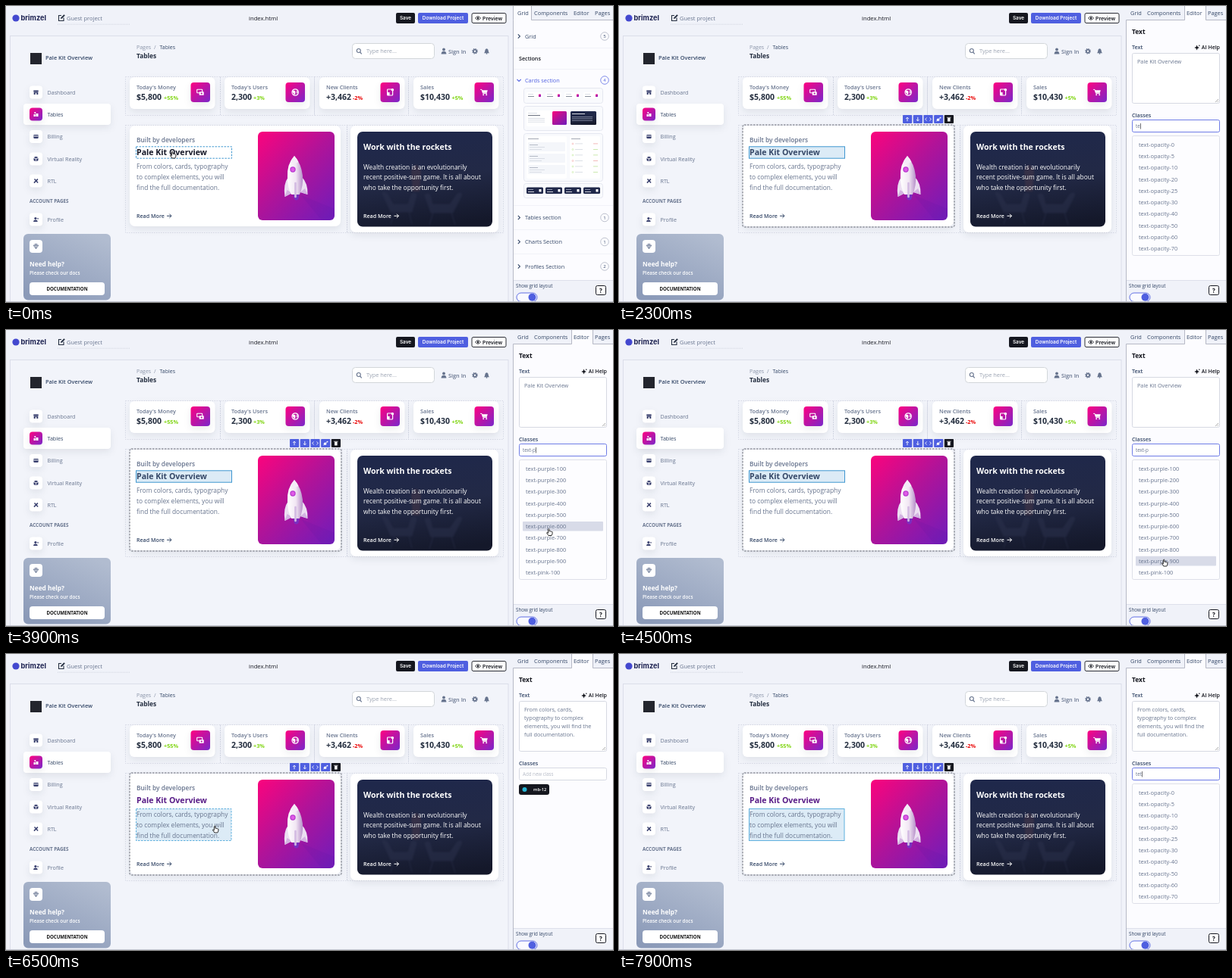
Write an HTML page that moves like this. It is 800 px wide and 391 px high and loops after 8000 ms.

```html
<!DOCTYPE html>
<html lang="en">
<head>
<meta charset="utf-8">
<title>Page editor</title>
<style>
html, body { margin: 0; height: 100%; overflow: hidden; background: #f0f2f9; }
svg { display: block; width: 100vw; height: 100vh; }
text { font-family: "Open Sans", "Noto Sans", sans-serif; white-space: pre; }
.ui { font-family: Inter, sans-serif; }
.soft { filter: drop-shadow(0 4px 5px #0f172a14); }
.blur { filter: blur(1.2px); }
</style>
</head>
<body>
<svg viewBox="0 0 800 391">
  <defs>
    <linearGradient id="pink" x1="0" y1="0" x2="1" y2="1"><stop stop-color="#ff0080"/><stop offset="1" stop-color="#7928ca"/></linearGradient>
    <linearGradient id="photo" x1="0" y1="0" x2=".9" y2="1"><stop stop-color="#fb047d"/><stop offset=".5" stop-color="#b01399"/><stop offset="1" stop-color="#741cb8"/></linearGradient>
    <linearGradient id="help" x1=".2" y1="1" x2=".8" y2="0"><stop stop-color="#8b9ab8"/><stop offset="1" stop-color="#b1bcd0"/></linearGradient>
    <linearGradient id="night" x1=".4" y1="0" x2=".6" y2="1"><stop stop-color="#1f284b"/><stop offset=".5" stop-color="#222946"/><stop offset="1" stop-color="#14182a"/></linearGradient>
    <linearGradient id="hull"><stop stop-color="#fff"/><stop offset=".55" stop-color="#f1e6f3"/><stop offset="1" stop-color="#b68fc9"/></linearGradient>
  </defs>
  <g id="base"></g>
  <g id="live"></g>
</svg>
<script>
const BLUE = '#4f5fe0', INK = '#252f40', SLATE = '#344767', BODY = '#67748e', BLACK = '#15171f';
const BRAND = 'Pale Kit Overview';
const PARA = ['From colors, cards, typography', 'to complex elements, you will', 'find the full documentation.'];

const text = (x, y, s, size, fill = SLATE, weight = 400, extra = '') =>
  `<text x="${x}" y="${y}" font-size="${size}" fill="${fill}" font-weight="${weight}" ${extra}>${s}</text>`;
const rect = (x, y, w, h, fill = '#fff', r = 0, extra = '') =>
  `<rect x="${x}" y="${y}" width="${w}" height="${h}" fill="${fill}" rx="${r}" ${extra}/>`;
const path = (d, stroke, width = 1, fill = 'none', extra = '') =>
  `<path d="${d}" stroke="${stroke}" stroke-width="${width}" fill="${fill}" ${extra}/>`;
const dot = (x, y, r, fill, extra = '') => `<circle cx="${x}" cy="${y}" r="${r}" fill="${fill}" ${extra}/>`;
const border = (color, width = 1, dash = 0) =>
  `stroke="${color}" stroke-width="${width}"` + (dash ? ` stroke-dasharray="${dash}"` : '');
const at = (x, y, s) => `<g transform="translate(${x} ${y})">${s}</g>`;
const many = (n, f) => Array.from({ length: n }, (_, i) => f(i)).join('');
const SOFT = 'class="soft"', MID = 'text-anchor="middle"';

// Icons are drawn around 0,0
const icons = {
  shop: c => rect(-2.8, -.5, 5.6, 3.5, c) + path('M-3.2 -1.6h6.4', c, 2) + rect(-.8, .8, 1.6, 2.2, '#fff'),
  chart: c => rect(-3, 0, 2.4, 3, c) + rect(0, -1, 3, 4, c) + dot(-1.2, -2, 1.1, c),
  card: c => rect(-3.2, -2.4, 6.4, 4.8, c, .8) + rect(-3.2, -1.1, 6.4, 1, '#fff'),
  box: c => path('M0 -3.3L3 -1.9L0 -.5L-3 -1.9ZM-3 -1L-.4 .3V3.3L-3 2ZM3 -1L.4 .3V3.3L3 2Z', 'none', 0, c),
  tool: c => path('M-2.6 2.6L2.4 -2.4M-2 -2.4L2.6 2.4', c, 1.5),
  person: c => dot(-.6, -1.5, 1.6, c) + path('M-3.4 3Q-3.4 .5 -.6 .5T2.2 3Z', 'none', 0, c) + rect(1.6, -1.6, 2, 1, c),
  money: c => rect(-4.5, -3.8, 7, 4.6, 'none', .6, border(c, 1.1)) + rect(-1.5, -.8, 6, 4.6, c, .6) + dot(1.5, 1.5, 1.1, '#b313a0'),
  globe: c => dot(0, 0, 4.2, 'none', border(c, 1.2)) + path('M-3 -2Q0 -3 .4 -.6T-1.4 3.4Q-2 .6 -3.6 0ZM1.6 -3L3.6 0L2 2Z', 'none', 0, c),
  page: c => rect(-3.6, -4, 7, 8, 'none', .8, border(c, 1.2)) + rect(-3.6, 0, 3, 4, c) + dot(3.2, -3.2, 1.8, c),
  cart: c => path('M-5 -3.6h1.8l1.6 5h5.4', c, 1) + path('M-3 -2.8h7.6l-1 3.6h-5.4z', 'none', 0, c) + dot(-1, 3.2, 1, c) + dot(3, 3.2, 1, c),
  gem: c => path('M-3.2 -1L-1.6 -3H1.6L3.2 -1L0 3.2ZM-3.2 -1H3.2M-1.2 -1L0 3L1.2 -1L0 -3Z', c, .7),
};
const arrow = (x, y, c) => path(`M${x} ${y}h6m-2.6 -2.6l2.6 2.6l-2.6 2.6`, c, 1);

function topBar() {
  return dot(13, 16, 4.6, '#4348cf') + text(19.5, 19, 'brimzel', 9.2, '#1c2150', 700, 'class="ui"')
    + path('M76 15.5V19.5H69.5V12.5H73', INK, 1.1) + path('M72 17l.4 -1.8l4 -4l1.4 1.4l-4 4z', 'none', 0, INK)
    + text(80, 18.8, 'Guest project', 7.5, BODY) + path('M68 24.2H164', '#c3c7d4', .7, 'none', 'stroke-dasharray="1"')
    + text(320, 18.8, 'index.html', 7.7, BLACK)
    + rect(514, 9, 25, 14, BLACK, 2) + text(526.5, 18.4, 'Save', 6.4, '#fff', 600, MID + ' class="ui"')
    + rect(543, 9, 66, 14, BLUE, 2) + text(576, 18.4, 'Download Project', 6.4, '#fff', 600, MID + ' class="ui"')
    + rect(614, 9.5, 45, 13, '#fff', 2, border(BLACK, .9)) + text(628, 18.5, 'Preview', 6.8, BLACK, 600, 'class="ui"')
    + path('M618.5 16Q622 11.6 625.5 16Q622 20.4 618.5 16Z', BLACK, .9) + dot(622, 16, 1.2, BLACK);
}

function sidebar() {
  const rows = [['Dashboard', 114, 'shop'], ['Tables', 143, 'chart'], ['Billing', 172.5, 'card'],
    ['Virtual Reality', 202, 'box'], ['RTL', 231, 'tool'], ['Profile', 282, 'person']];
  return rect(32, 62, 15, 15, '#23252d') + text(52, 71.4, BRAND, 7.4, SLATE, 600)
    + rect(23, 129, 115, 28, '#fff', 4, SOFT)
    + rows.map(([name, y, icon]) => {
      const on = name === 'Tables';
      return rect(31, y - 8.5, 17, 17, on ? 'url(#pink)' : '#fff', 4, SOFT)
        + at(39.5, y, icons[icon](on ? '#fff' : '#3a416f')) + text(54.5, y + 2.6, name, 7.15, on ? SLATE : BODY, on ? 500 : 400);
    }).join('')
    + text(31, 260.3, 'ACCOUNT PAGES', 6.3, BODY, 700)
    + rect(23, 301, 115, 87.5, 'url(#help)', 6) + rect(31, 309, 17, 17, '#fff', 4) + at(39.5, 317.5, icons.gem('#5c6a8a'))
    + text(31, 344, 'Need help?', 8.3, '#fff', 700) + text(31, 354.5, 'Please check our docs', 6.3, '#fff', 600)
    + rect(31, 365, 99, 17, '#fff', 4) + text(80.5, 375.7, 'DOCUMENTATION', 6.1, '#111', 700, MID);
}

function pageHead() {
  return text(172, 56.6, 'Pages', 7, '#8a94a8') + text(195, 56.6, '/', 7, '#8a94a8') + text(202.5, 56.6, 'Tables', 7, SLATE)
    + text(172, 69, 'Tables', 8.4, INK, 700)
    + rect(456.5, 49.5, 108, 20, '#fff', 4, border('#d2d6da')) + dot(464.8, 59, 2.5, 'none', border(BODY, 1.1))
    + path('M466.6 61L468.8 63.3', BODY, 1.2) + text(475, 62.4, 'Type here...', 7.4, '#9aa2b1')
    + dot(577, 57.4, 1.9, BODY) + path('M573.6 63.6Q573.6 59.8 577 59.8T580.4 63.6Z', 'none', 0, BODY)
    + text(583, 62.5, 'Sign In', 7.3, BODY, 600)
    + dot(618, 59.7, 2.1, 'none', border(BODY, 1.8)) + dot(618, 59.7, 3.3, 'none', border(BODY, 1.1, 1.3))
    + path('M630 62.2Q631.3 60.8 631.3 58.9Q631.5 56.4 633.5 56.2Q635.5 56.4 635.7 58.9Q635.7 60.8 637 62.2Z', 'none', 0, BODY) + dot(633.5, 62.8, .9, BODY);
}

function stats() {
  const cards = [[163, "Today's Money", '$5,800', 208, '+55%', 'money'], [288, "Today's Users", '2,300', 326, '+3%', 'globe'],
    [413, 'New Clients', '+3,462', 457, '-2%', 'page'], [537, 'Sales', '$10,430', 587.5, '+5%', 'cart']];
  return cards.map(([x, label, value, px, change, icon]) => rect(x, 94, 112.5, 42, '#fff', 6, SOFT)
    + text(x + 9, 109.8, label, 7.3, BODY, 600) + text(x + 9, 124.3, value, 10.5, INK, 700)
    + text(px, 124, change, 7.3, change[0] === '-' ? '#ea0606' : '#82d616', 700)
    + rect(x + 80.5, 101, 25.5, 26, 'url(#pink)', 4, SOFT) + at(x + 93.2, 114, icons[icon]('#fff'))).join('');
}

function rocket() {
  return path('M372 226Q365 235 367.5 252L377 247ZM390 226Q398 234 397.5 249L388 246Z', 'none', 0, '#ecdff2')
    + path('M367.5 252L370.5 243L377 247ZM397.5 249L394 241L388 246Z', 'none', 0, '#d3b3e2')
    + path('M378 247h9l-1.6 8q-2.8 3 -5.6 0z', 'none', 0, '#7a2fc0')
    + path('M380 198Q370 209 371 226Q371 240 376 249H387Q392 238 391 224Q389 208 380 198Z', 'none', 0, 'url(#hull)')
    + path('M380 198Q376.5 202 374.6 206.5Q379.5 208.5 385.6 206.2Q383.5 201.6 380 198Z', 'none', 0, '#f4ecf7')
    + dot(378, 216, 3.7, '#b93bd0') + dot(378, 216, 2.4, '#e05be6')
    + path('M381.5 234V252', '#d3bbe2', 2.6, 'none', 'stroke-linecap="round"');
}

function bigCards() {
  const pitch = ['Wealth creation is an evolutionarily', 'recent positive-sum game. It is all about', 'who take the opportunity first.'];
  return rect(163, 158, 278, 133, '#fff', 7, SOFT) + text(172, 180, 'Built by developers', 8.4, BODY, 600)
    + text(172, 279.8, 'Read More', 7.1, SLATE, 600) + arrow(212, 277.3, SLATE)
    + rect(332, 166, 101, 117, 'url(#photo)', 6)
    + path('M389 250L433 268V277Q433 283 427 283H416Z', 'none', 0, '#5e189f', 'opacity=".15"') + rocket()
    + rect(454, 158, 195, 141, '#fff', 7, SOFT) + rect(463, 166, 178, 125.5, 'url(#night)', 7)
    + path('M496 247Q497 244 503 249L510 262H530L534 249Q540 245 541 250L535 272H507ZM512 272L507 288M531 272L535 288M552 250Q556 246 559 250L562 262H585L595 248Q602 245 600 251L589 273H560ZM563 273L558 289M587 273L592 289', '#2b314c', 1.2, '#2b314c', 'opacity=".55" class="blur"')
    + path('M534 218Q540 202 547 218L545 245H536Z', 'none', 0, '#4e3947', 'opacity=".45" class="blur"')
    + text(471, 190, 'Work with the rockets', 10.55, '#fff', 700)
    + pitch.map((s, i) => text(471, 215.5 + i * 13.8, s, 8.4, '#fff')).join('')
    + text(471, 279.8, 'Read More', 7.1, '#fff', 600) + arrow(511.5, 277.3, '#fff');
}

function gridLines() {
  const cells = [[157.5, 93.5, 125, 51], [282.5, 93.5, 124, 51], [406.5, 93.5, 124, 51], [530.5, 93.5, 125, 51],
    [157.5, 157.5, 292, 142], [449.5, 157.5, 206, 142]];
  return cells.map(c => rect(...c, 'none', 0, border('#ccd0de', .7, 1.5))).join('');
}

function frame(left, right) {
  return rect(668, 0, 132, 391, '#f0f2f9') + rect(668, 18, 132, 344, '#fcfcff') + rect(left, 0, right - left, 19, '#fcfcff')
    + path(`M668.5 391V18.5${left > 668 ? `H${left}.5V0` : 'V0'}M${right}.5 0V18.5H800`, '#9a9eae', .7)
    + [['Grid', 674], ['Components', 696], ['Editor', 748], ['Pages', 776]].map(([s, x]) => text(x, 11.6, s, 7.4, SLATE, 500)).join('')
    + path('M669 362.5H800', '#d9dce7', .8) + text(672, 372, 'Show grid layout', 6.25, SLATE)
    + rect(673, 379, 27, 11.5, '#fafaff', 5.8, border(BLUE, .9)) + dot(693.5, 384.7, 5, BLUE)
    + rect(777.5, 369.5, 13, 12, '#fff', 2, border(BLACK, 1)) + text(784, 378.8, '?', 8, BLACK, 700, MID);
}

function section(y, name, count, open) {
  const c = open ? BLUE : SLATE;
  return path(open ? `M673.5 ${y - 1.2}l2.6 2.6l2.6 -2.6` : `M674.8 ${y - 2.6}l2.6 2.6l-2.6 2.6`, c, 1.1)
    + text(684, y + 2.7, name, 7.3, c) + dot(789, y, 5.3, 'none', border(open ? BLUE : '#a5abba', .7)) + text(789, y + 2.2, count, 6, c, 400, MID);
}

function thumbs() {
  const line = (x, y, w, c = '#d3d7e0') => rect(x, y, w, .8, c);
  const box = (y, h) => rect(682.5, y, 104, h, '#f9fafd', 3, border('#e0e3ec', .8));
  return box(108.5, 20) + many(4, i => rect(686 + i * 25, 114, 21, 8, '#fff', 1.5) + line(688 + i * 25, 116, 7)
      + line(688 + i * 25, 119, 8, '#6a7284') + rect(702 + i * 25, 116.5, 3, 3.5, 'url(#pink)', .6))
    + box(132.5, 32) + rect(686, 138, 55, 21, '#fff', 2) + line(688, 141, 12) + line(688, 144, 16, '#4a5162') + many(3, i => line(688, 148 + i * 2.4, 22))
    + rect(720, 139, 19, 18, 'url(#photo)', 1.5) + rect(744, 139, 34, 18, 'url(#night)', 1.5) + line(746, 142, 17, '#fff') + many(3, i => line(746, 146 + i * 2.4, 27, '#8d94ab'))
    + box(168.5, 63) + rect(686, 172, 53, 56, '#fff', 2) + rect(743, 172, 40, 56, '#fff', 2) + line(688, 175, 14, '#8b92a2') + line(745, 175, 12, '#8b92a2')
    + many(3, i => rect(688, 180 + i * 15, 49, 12, '#f4f6fa', 1) + line(690, 183 + i * 15, 11, '#a3aab8') + line(690, 186 + i * 15, 20) + line(690, 189 + i * 15, 16))
    + many(6, i => dot(747, 182 + i * 7.5, 1, 'none', border(i % 3 ? '#a8dd78' : '#ee8888', .4)) + line(750, 181.5 + i * 7.5, 10) + line(774, 181.5 + i * 7.5, 6, i % 3 ? '#bfe49c' : '#efaaaa'))
    + box(234.5, 19) + many(4, i => rect(686 + i * 25, 239.5, 22, 8.5, '#20284a', 1.5) + line(688 + i * 25, 242, 7, '#aab0c6') + line(688 + i * 25, 245, 8, '#fff') + rect(702.5 + i * 25, 242, 3, 3.5, '#fff', .6));
}

function gridPanel() {
  return frame(668, 692) + section(40, 'Grid', 5) + text(676, 72, 'Sections', 7.2, BLACK, 600)
    + section(98, 'Cards section', 4, true) + thumbs()
    + section(279.5, 'Tables section', 1) + section(311.5, 'Charts Section', 1) + section(344, 'Profiles Section', 2)
    + path('M669 55.5H800M669 83.5H800M669 263.5H800M669 295.5H800M669 327.5H800', '#eceef5', .7);
}

const ruler = document.createElement('canvas').getContext('2d');
ruler.font = '6.25px "Open Sans", "Noto Sans", sans-serif';

const chip = (x, y, w, s) => rect(x, y, w, 14, BLACK, 3) + dot(x + 7.5, y + 7, 3, '#25b5d4') + text(x + 19, y + 9, s, 5.7, '#fff', 600);

function dropdown(typed, mouse) {
  const names = typed === 'text-p'
    ? [1, 2, 3, 4, 5, 6, 7, 8, 9].map(n => `text-purple-${n}00`).concat('text-pink-100')
    : [0, 5, 10, 20, 25, 30, 40, 50, 60, 70].map(n => 'text-opacity-' + n);
  const over = mouse && mouse[1] > 175 ? Math.min(9, Math.max(0, Math.round((mouse[1] - 188) / 15.3 + .2))) : -1;
  return rect(676.5, 171.5, 115, 158, '#fdfdff', 2, border('#d6d9e3', .8))
    + names.map((s, i) => (i === over ? rect(681, 176.4 + i * 15.3, 106, 12.6, '#d8dbe8', 1) : '')
      + text(685, 185.6 + i * 15.3, s, 7.4, BODY)).join('');
}

function editorPanel(t, typed, focus, mouse, onPara) {
  const lines = onPara ? ['From colors, cards,', 'typography to complex', 'elements, you will find the', 'full documentation.'] : [BRAND];
  let s = frame(745, 773) + text(676, 36.5, 'Text', 8.4, BLACK, 700) + text(676, 57, 'Text', 7.2, SLATE, 600)
    + path('M761.6 51.6l1 2.4l2.4 1l-2.4 1l-1 2.4l-1 -2.4l-2.4 -1l2.4 -1z', 'none', 0, BLACK) + dot(764.8, 52.2, .8, BLACK)
    + text(767.8, 57, 'AI Help', 7, BLACK, 600)
    + rect(676.5, 62.5, 115, 66, '#fff', 2, border('#d2d5df', .9)) + path('M786 127l4 -4M788.5 127l1.5 -1.5', '#777', .6)
    + lines.map((l, i) => text(683, 75.7 + i * 11.1, l, 7.25, BODY)).join('')
    + text(676, 147, 'Classes', 7.2, SLATE, 600)
    + rect(676.5, 150.5, 115, 16, '#fff', 2, focus ? border('#6f7de6', 1) : border('#d2d5df', .9));
  s += typed ? text(681, 160.9, typed, 6.25, BODY) : text(681, 160.9, 'Add new class', 6.2, '#b5bac6');
  const lastKey = Math.max(focus || 0, ...keys.filter(k => k[0] <= t).map(k => k[0]));
  if (focus && (t - lastKey) % 1000 < 500) s += rect(681.3 + ruler.measureText(typed).width, 155, .6, 7.5, BLACK);
  if (typed) return s + dropdown(typed, mouse);
  if (onPara) return s + chip(676, 172, 40, 'mb-12');
  s += chip(676, 172, 48, 'font-bold') + chip(727, 172, 48, 'font-sans');
  if (t < 1300) {
    s += chip(676, 190, 59, 'text-gray-900');
    if (t >= 900) s += rect(724, 191, 10, 12, BLACK) + text(726.3, 199.7, '×', 8, '#fff', 700);
  } else if (t >= 4800) s += chip(676, 190, 68, 'text-purple-900');
  return s;
}

function toolbar() {
  return many(5, i => rect(374 + i * 13.7, 144, 12.2, 11, i < 4 ? BLUE : BLACK, 1))
    + path('M380 152.2v-5m-1.8 1.8l1.8 -1.8l1.8 1.8M393.8 146.8v5m-1.8 -1.8l1.8 1.8l1.8 -1.8M405.6 147.6l-2 1.9l2 1.9M409.4 147.6l2 1.9l-2 1.9', '#fff', .9)
    + dot(420.6, 150.2, 1.8, '#fff') + path('M418.4 152.2l4.8 -4.6', '#fff', .9) + dot(423.6, 147.6, .9, '#fff')
    + rect(433, 148, 3.6, 4.4, '#fff', .5) + path('M432.2 147.3h5.2', '#fff', .8);
}

// Key presses: time, field content
const keys = [[2100, 't'], [2200, 'te'], [2500, 'tex'], [2600, 'text'], [2700, 'text-'], [2900, 'text-p'],
  [4800, ''], [7500, 't'], [7700, 'te'], [7800, 'tet']];

// Pointer stops: time, x, y
const stops = [[0, 220, 196], [400, 220, 196], [1000, 731, 199], [1300, 731, 199], [1700, 712, 160], [2100, 712, 160],
  [2900, 708, 164], [3300, 711, 192], [4300, 719, 307], [4900, 719, 307], [5900, 276, 231], [6600, 276, 231], [7200, 706, 160], [8000, 706, 160]];

function pointer(t) {
  if ((t >= 2100 && t < 3000) || t >= 7500) return null;
  const i = stops.findIndex((p, n) => n && t < p[0]);
  const [a, b] = [stops[i - 1], stops[i]];
  let k = (t - a[0]) / (b[0] - a[0]);
  k = k * k * (3 - 2 * k);
  return [a[1] + (b[1] - a[1]) * k, a[2] + (b[2] - a[2]) * k];
}

const hand = ([x, y]) => at(x, y, path('M-1.6 .5V-3.2Q-.8 -4.6 0 -3.2V-.6Q1 -1.4 1.5 -.4Q2.4 -1 2.8 0Q4 -.4 4 1Q4 3.4 2.8 5H-1.2Q-2.6 3 -3.6 1.4Q-3.2 .2 -1.6 1.8Z', '#111', .9, '#fff'));

function scene(t) {
  const mouse = pointer(t), picked = t >= 400, onPara = t >= 6200;
  const typed = (keys.filter(k => k[0] <= t).pop() || [0, ''])[1];
  const focus = t >= 1800 && t < 4800 ? 1800 : t >= 7200 ? 7200 : 0;
  let s = '';
  if (picked) s += rect(163, 157, 279, 135, 'none', 2, border('#5c5f6a', .9, '2.5 1.5')) + toolbar();
  const hover = mouse && mouse[0] < 298 && mouse[0] > 171;
  const dashes = hover ? '2.5 1.5' : 0;
  if (!onPara) s += rect(171.5, 185.8, 126, 15.4, picked ? '#dcebf6' : 'none', 0, border('#3f97d0', 1, t < 600 ? '2.5 1.5' : 0));
  if (onPara || (t >= 5700 && hover)) s += rect(171.5, 204.5, 125.5, 42, onPara ? '#dcebf6' : 'none', 0, border('#5fb0de', 1, dashes));
  s += text(172, 197.2, BRAND, 10.6, t < 1300 ? '#141727' : t < 4800 ? SLATE : '#581c87', 700)
    + PARA.map((l, i) => text(172, 214.9 + i * 13.8, l, 8.42, BODY)).join('')
    + (picked ? editorPanel(t, typed, focus, mouse, onPara) : gridPanel())
    + rect(0, 390, 800, 1, '#c4c7d2');
  return s + (mouse ? hand(mouse) : '');
}

const base = document.getElementById('base'), live = document.getElementById('live');
base.innerHTML = rect(0, 0, 800, 391, '#f0f2f9') + topBar() + rect(5.5, 39.5, 656.5, 360, '#f2f4fa', 0, border('#d9dce8', .9))
  + gridLines() + sidebar() + pageHead() + stats() + bigCards();

let shown = -1;
function tick() {
  const t = Math.floor(performance.now() % 8000 / 100) * 100;
  if (t !== shown) live.innerHTML = scene(shown = t);
  requestAnimationFrame(tick);
}
tick();
</script>
</body>
</html>
```
